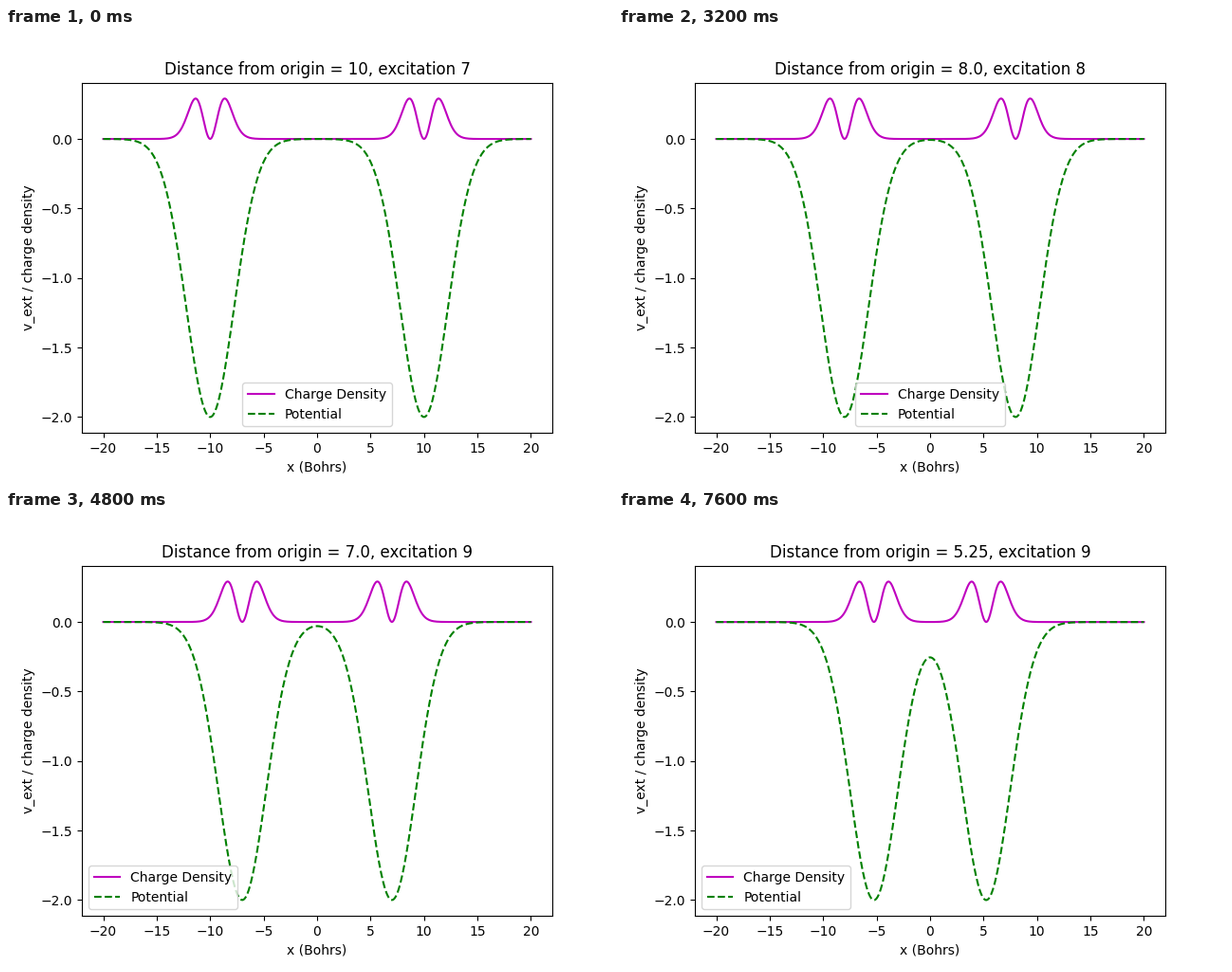
A matplotlib script that plays this animation: 640 px wide and 480 px high, repeating every 8000 ms.

```python
import numpy as np
import matplotlib.pyplot as plt
from matplotlib.animation import FuncAnimation

FRAMES = 20
INTERVAL = 400
WELL_DEPTH = 2.0
WELL_WIDTH = 10.0
EXCITATIONS = [7] * 8 + [8] * 2 + [9] * 3 + [10] * 4 + [9] * 3

x = np.linspace(-20, 20, 401)
u = np.linspace(-20, 20, 801)


def well(r):
    return -WELL_DEPTH * np.exp(-r**2 / WELL_WIDTH)


def first_excited_density():
    """Density of the first excited state in one well centred on zero."""
    h = u[1] - u[0]
    hop = np.full(u.size - 1, -0.5 / h**2)
    hamiltonian = np.diag(1 / h**2 + well(u)) + np.diag(hop, 1) + np.diag(hop, -1)
    states = np.linalg.eigh(hamiltonian)[1]
    return states[:, 1]**2 / h


single_density = first_excited_density()


def density(r):
    return np.interp(r, u, single_density)


def legend_place(frame):
    if frame < 9:
        return "lower center"
    return "center right" if frame < 12 else "lower left"


fig, ax = plt.subplots(figsize=(6.4, 4.8), dpi=100)


def draw(frame):
    distance = 10 - 0.25 * frame if frame else 10
    ax.clear()
    ax.plot(x, density(x - distance) + density(x + distance), "m-",
            label="Charge Density")
    ax.plot(x, well(x - distance) + well(x + distance), "g--",
            label="Potential")
    ax.set_title(f"Distance from origin = {distance}, "
                 f"excitation {EXCITATIONS[frame]}")
    ax.set_xlabel("x (Bohrs)")
    ax.set_ylabel("v_ext / charge density")
    ax.legend(loc=legend_place(frame))


anim = FuncAnimation(fig, draw, frames=FRAMES, init_func=lambda: draw(0),
                     interval=INTERVAL, repeat=True, repeat_delay=0)
plt.show()
```
